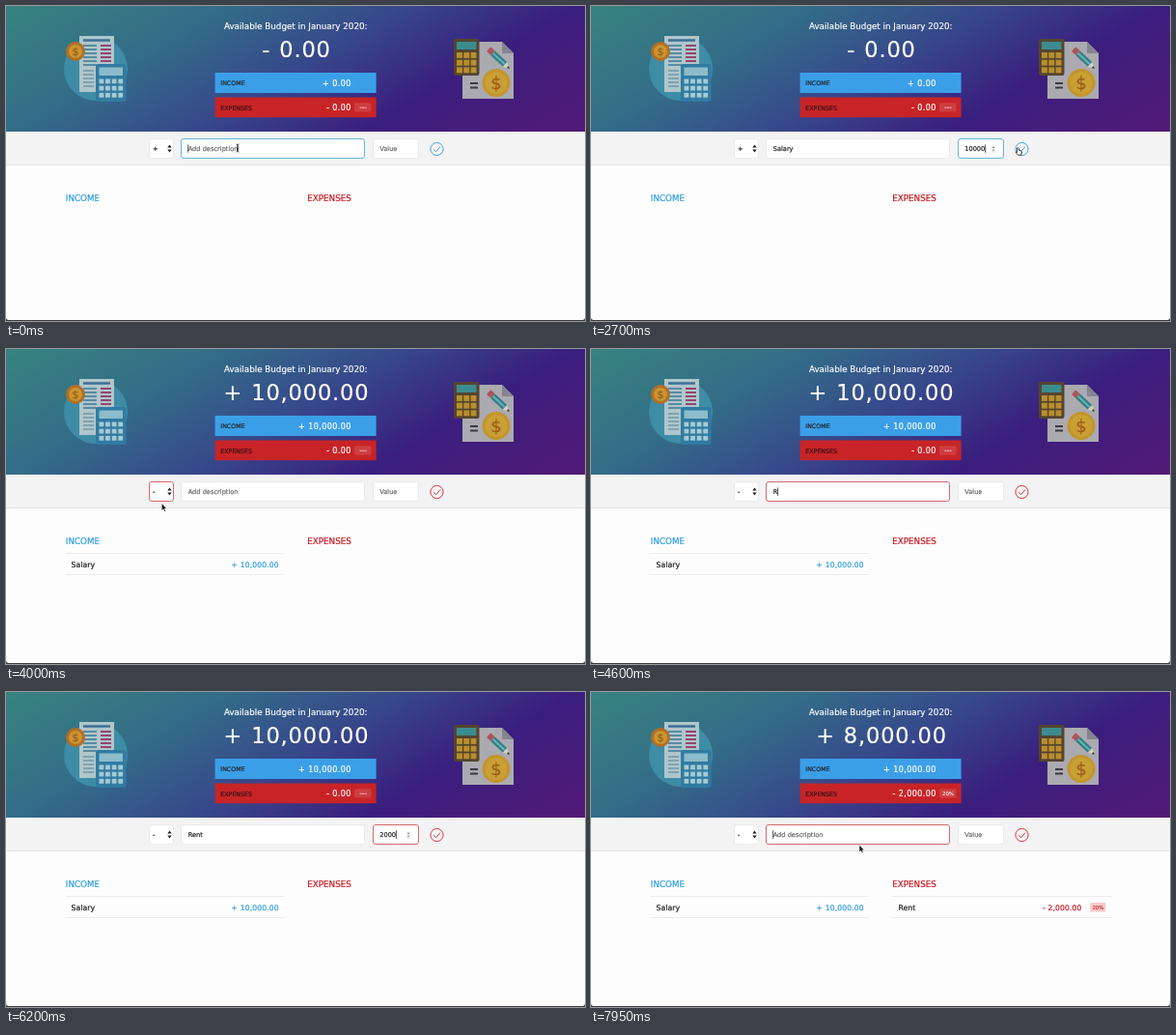
Animation, 600 px wide and 326 px high, one loop 8000 ms. Source, as an HTML page:

```html
<!DOCTYPE html>
<html lang="en">
<head>
<meta charset="utf-8">
<title>Budget</title>
<style>
  html, body { margin: 0; width: 100%; height: 100%; overflow: hidden; background: #fefdfe; }
  svg { display: block; width: 600px; height: 326px; font-family: "DejaVu Sans", Verdana, sans-serif; }
  text { fill: currentColor; stroke: currentColor; stroke-width: .2px; }
  .end { text-anchor: end; }
  .mid { text-anchor: middle; }
  .white { color: #fff; }
  .blue { color: #2a9de0; }
  .red { color: #c8161c; }
  .head { font-size: 8.75px; }
  .label { font-size: 6.3px; color: #23262c; }
  .sum { font-size: 8px; letter-spacing: .42px; color: #fff; }
  .field { fill: #fff; stroke-width: 1; }
  .input { font-size: 6.65px; }
  .row { font-size: 7.85px; color: #222; }
  .amount { font-size: 7.6px; letter-spacing: .15px; }
  .pct { font-size: 5.4px; text-anchor: middle; stroke-width: .1px; }
  .rule { stroke: #ececee; stroke-width: 1; }
</style>
</head>
<body>
<svg viewBox="0 0 600 326">
  <defs>
    <linearGradient id="sky" gradientUnits="userSpaceOnUse" x1="0" y1="0" x2="211" y2="359">
      <stop offset="0" stop-color="#38837f"/>
      <stop offset=".28" stop-color="#336c88"/>
      <stop offset=".5" stop-color="#37488b"/>
      <stop offset=".72" stop-color="#3a1e7e"/>
      <stop offset="1" stop-color="#541a77"/>
    </linearGradient>
  </defs>
  <rect width="600" height="326" fill="#3c3c40"/>
  <path d="M0 0H600V322Q600 325 597 325H3Q0 325 0 322Z" fill="#fefdfe"/>
  <rect width="600" height="130" fill="url(#sky)"/>

  <!-- invoice and calculator -->
  <g>
    <circle cx="93" cy="65" r="33" fill="#3e8ca6"/>
    <path d="M76 31H112V89H76Z" fill="#b0c6ca"/>
    <path d="M80 35.5H108" stroke="#3b6f96" stroke-width="2.5"/>
    <path d="M80 41H94M80 45H94M80 49H94M80 53H94M80 57H94M80 61H94" stroke="#3b7898" stroke-width="1.5"/>
    <path d="M98 41H109M98 45H109M98 49H109M98 53H109M98 57H109" stroke="#914672" stroke-width="1.8"/>
    <path d="M80 67H91M80 71H91M80 75H91M80 79H91M80 83H91" stroke="#6f98a8" stroke-width="1.4"/>
    <circle cx="72" cy="47" r="10" fill="#b06f28"/>
    <circle cx="72" cy="47" r="7" fill="#c9952f"/>
    <text x="72" y="51" class="mid" font-size="11" color="#9a5a20">$</text>
    <rect x="93" y="60" width="31.5" height="39" rx="2.5" fill="#317ba2"/>
    <rect x="96.5" y="63.5" width="24.5" height="8.5" fill="#8cbccb"/>
    <g id="keysLeft" fill="#a6cad4"></g>
  </g>

  <!-- calculator, sheet and coin -->
  <g>
    <path d="M473 37H514L526 49V96H473Z" fill="#abaab0"/>
    <path d="M514 37V49H526Z" fill="#85848f"/>
    <rect x="464" y="34" width="26.5" height="38" rx="2" fill="#54452f"/>
    <rect x="467" y="37" width="20.5" height="8" fill="#3b8c8e"/>
    <g id="keysRight" fill="#b98f2c"></g>
    <g transform="translate(522 65) rotate(223)">
      <path d="M0 0L7-3.2V3.2Z" fill="#d3cfc6"/>
      <path d="M0 0L3-1.4V1.4Z" fill="#333"/>
      <rect x="7" y="-3.2" width="17" height="6.4" fill="#2f7f86"/>
      <rect x="7" y="-1" width="17" height="2" fill="#6fb0ae"/>
      <rect x="24" y="-3.2" width="6" height="6.4" rx="1" fill="#a8555a"/>
    </g>
    <path d="M481 80H489M481 84.5H489" stroke="#3b3a42" stroke-width="1.8"/>
    <circle cx="508" cy="79.5" r="14.5" fill="#c2952f"/>
    <circle cx="508" cy="79.5" r="11.5" fill="#c9a033"/>
    <text x="508" y="86" class="mid" font-size="18" color="#9c5a20">$</text>
  </g>

  <text x="300.2" y="24" class="mid white" font-size="8.75">Available Budget in January 2020:</text>
  <text id="budget" x="301" y="53" class="mid white" font-size="22.5" letter-spacing=".85" word-spacing="1"></text>

  <rect x="216.6" y="69" width="167" height="21" fill="#3b9fe8"/>
  <rect x="216.6" y="94.5" width="167" height="20.7" fill="#c82427"/>
  <text x="222.3" y="82.3" class="label">INCOME</text>
  <text x="222.3" y="107.8" class="label" style="color:#3a1216">EXPENSES</text>
  <text id="incomeSum" x="357.7" y="83" class="sum end"></text>
  <text id="expenseSum" x="357.7" y="108.3" class="sum end"></text>
  <rect x="361" y="100.3" width="17.5" height="9.2" rx="1.5" fill="#fff" fill-opacity=".12"/>
  <text id="share" x="370" y="107" class="pct white"></text>

  <rect y="130" width="600" height="35" fill="#f4f3f4"/>
  <path d="M0 164.5H600" stroke="#e6e5e7"/>
  <rect id="typeBox" class="field" x="148.5" y="137.5" width="25" height="20" rx="2.5"/>
  <text id="sign" x="151.9" y="150.3" class="input" color="#111"></text>
  <path d="M167.3 146.6L169.5 143.4L171.7 146.6ZM167.3 148.4L169.5 151.6L171.7 148.4Z" fill="#222"/>
  <rect id="descBox" class="field" x="181.5" y="137.5" width="190" height="20" rx="2.5"/>
  <text id="desc" x="188.7" y="150.2" class="input"></text>
  <rect id="valueBox" class="field" x="380.5" y="137.5" width="47" height="20" rx="2.5"/>
  <text id="value" x="387.2" y="150.2" class="input"></text>
  <g id="spinner">
    <rect x="414.5" y="143.9" width="5" height="8" rx="1" fill="#f1f1f1"/>
    <path d="M415.7 147L417 145.1L418.3 147ZM415.7 148.7L417 150.6L418.3 148.7Z" fill="#8a8a8a"/>
  </g>
  <path id="caret" stroke="#222" stroke-width=".8"/>
  <g id="check" fill="none" stroke-width=".9">
    <circle cx="446.5" cy="148" r="6.6"/>
    <path d="M443.3 148.3L445.6 150.7L450 145.6"/>
  </g>

  <text x="61.8" y="202" class="head blue">INCOME</text>
  <text x="312.3" y="202" class="head red">EXPENSES</text>
  <g id="incomeRow">
    <path class="rule" d="M61.5 211.5H288M61.5 233.5H288"/>
    <text x="67.6" y="225.7" class="row">Salary</text>
    <text x="282.7" y="225.7" class="amount end blue">+ 10,000.00</text>
  </g>
  <g id="expenseRow">
    <path class="rule" d="M312 211.5H540M312 233.5H540"/>
    <text x="318.4" y="225.7" class="row">Rent</text>
    <text x="508.6" y="225.7" class="amount end red">- 2,000.00</text>
    <rect x="517.3" y="218" width="16" height="9.6" rx="1" fill="#fbcaca"/>
    <text x="525.4" y="224.9" class="pct red">20%</text>
  </g>

  <g id="menu">
    <rect x="140.5" y="140.5" width="31" height="30" rx="3" fill="#000" opacity=".12"/>
    <rect x="142" y="140" width="28" height="28.5" rx="2.5" fill="#6b6b6e"/>
    <rect id="pick" x="142" width="28" height="10.8" fill="#3a8eea"/>
    <path d="M145.3 149.2L147 151.2L149.8 146.8" fill="none" stroke="#fff" stroke-width=".9"/>
    <text x="152" y="151.3" class="input white">+</text>
    <text x="152.3" y="162.3" class="input white" font-weight="700">-</text>
  </g>

  <g id="cursor">
    <path id="arrow" d="M0 0V7.5L1.8 5.9L3 8.5L4.2 8L3.1 5.4H5.2Z" fill="#111" stroke="#fff" stroke-width=".5"/>
    <path id="beam" d="M-1.5-4Q0-4 0-3V3Q0 4-1.5 4M1.5-4Q0-4 0-3V3Q0 4 1.5 4M-1 1H1" fill="none" stroke="#222" stroke-width=".8"/>
    <path id="hand" d="M0 0Q1-.9 1.7.3L2.2 2.4L4.4 3.1Q5.2 3.5 4.9 5L4.3 7.2H1.2L-1.4 4.7Q-1.5 3.8-.4 4.2L.2 4.5Z" fill="#fff" stroke="#111" stroke-width=".8"/>
  </g>
</svg>
<script>
const LOOP = 8000, STEP = 50;
const ADD_INCOME = 2900, OPEN_MENU = 3400, PICK_MINUS = 3950, ADD_EXPENSE = 6900;
const FADE = 220;

const typing = {
  desc: [
    { text: "Salary", start: 120, gap: 100, end: ADD_INCOME },
    { text: "Rent", start: 4550, gap: 140, end: ADD_EXPENSE }
  ],
  value: [
    { text: "10000", start: 1750, gap: 125, end: ADD_INCOME },
    { text: "2000", start: 5600, gap: 140, end: ADD_EXPENSE }
  ]
};
const focusSteps = [
  [-1000, "desc"], [780, "value"], [ADD_INCOME, "desc"], [OPEN_MENU, "type"],
  [4200, "desc"], [5300, "value"], [ADD_EXPENSE, "desc"]
];
// time, x, y
const path = [
  [0, 240, 147], [2200, 240, 147], [2650, 441.5, 147], [2950, 441.5, 147],
  [3350, 164, 150], [3600, 164, 150], [3800, 160, 160], [3980, 160, 160],
  [4200, 215, 148], [6350, 215, 148], [6750, 444, 147], [7050, 444, 147],
  [7950, 278, 158.3]
];
const hidden = [[200, 2200], [4450, 6350]];

const $ = {};
document.querySelectorAll("[id]").forEach(el => $[el.id] = el);
const show = (el, on) => el.setAttribute("visibility", on ? "visible" : "hidden");
const put = (el, text) => { if (el.textContent !== text) el.textContent = text; };
const within = (t, a, b) => t >= a && t < b;

function keys(group, x, y, dx, dy, cols, rows, size) {
  for (let i = 0; i < cols * rows; i++) {
    const key = document.createElementNS("http://www.w3.org/2000/svg", "rect");
    const box = { x: x + i % cols * dx, y: y + Math.floor(i / cols) * dy, width: size, height: size };
    for (const name in box) key.setAttribute(name, box[name]);
    group.append(key);
  }
}
keys($.keysLeft, 96.5, 75.5, 6.6, 7.2, 4, 3, 4.8);
keys($.keysRight, 467, 48, 7.3, 7.7, 3, 3, 5.9);

function typed(name, t) {
  const run = typing[name].find(r => within(t, r.start, r.end));
  if (!run) return { text: "", last: -1000 };
  const n = Math.min(run.text.length, Math.floor((t - run.start) / run.gap) + 1);
  return { text: run.text.slice(0, n), last: run.start + (n - 1) * run.gap };
}

function mix(a, b, k) {
  return `rgb(${a.map((v, i) => Math.round(v + (b[i] - v) * k))})`;
}

function pointer(t) {
  const i = path.findIndex(p => p[0] > t);
  if (i < 0) return path[path.length - 1].slice(1);
  const [t0, x0, y0] = path[i - 1], [t1, x1, y1] = path[i];
  const k = (t - t0) / (t1 - t0), e = k * k * (3 - 2 * k);
  return [x0 + (x1 - x0) * e, y0 + (y1 - y0) * e];
}

function cursorKind(x, y) {
  if (Math.hypot(x - 446.5, y - 148) < 7) return "hand";
  const inField = within(x, 181, 372) || within(x, 380, 428);
  return inField && within(y, 137, 158) ? "beam" : "arrow";
}

function drawFields(t) {
  const minus = t >= PICK_MINUS;
  const accent = minus ? [212, 104, 106] : [104, 180, 210];
  const index = focusSteps.filter(s => s[0] <= t).length - 1;
  const [since, focus] = focusSteps[index];
  const previous = index ? focusSteps[index - 1][1] : "";
  const k = Math.min(1, (t - since) / FADE);

  for (const name of ["type", "desc", "value"]) {
    const glow = name === focus ? k : name === previous ? 1 - k : 0;
    $[name + "Box"].setAttribute("stroke", mix([234, 234, 236], accent, glow));
  }
  for (const [name, hint] of [["desc", "Add description"], ["value", "Value"]]) {
    const { text, last } = typed(name, t);
    put($[name], text || hint);
    $[name].setAttribute("color", text ? "#222" : "#6a6a6a");
    if (name !== focus) continue;
    const width = text ? $[name].getComputedTextLength() + .3 : 0;
    const x = +$[name].getAttribute("x") + width;
    $.caret.setAttribute("d", `M${x} 143.4V151.8`);
    show($.caret, (t - Math.max(since, last)) % 1000 < 500);
  }
  if (focus === "type") show($.caret, false);
  show($.spinner, focus === "value");
  put($.sign, minus ? "-" : "+");
  $.check.setAttribute("stroke", minus ? "#cc2630" : "#2f9bd8");
}

function drawTotals(t) {
  const earned = t >= ADD_INCOME, spent = t >= ADD_EXPENSE;
  put($.budget, spent ? "+ 8,000.00" : earned ? "+ 10,000.00" : "- 0.00");
  put($.incomeSum, earned ? "+ 10,000.00" : "+ 0.00");
  put($.expenseSum, spent ? "- 2,000.00" : "- 0.00");
  put($.share, spent ? "20%" : "---");
  $.share.style.fontSize = spent ? "5.4px" : "7px";
  show($.incomeRow, earned);
  show($.expenseRow, spent);
}

function drawPointer(t) {
  const [x, y] = pointer(t), kind = cursorKind(x, y);
  const visible = !hidden.some(([a, b]) => within(t, a, b));
  $.cursor.setAttribute("transform", `translate(${x} ${y})`);
  for (const name of ["arrow", "beam", "hand"]) show($[name], visible && name === kind);
  show($.menu, within(t, OPEN_MENU, PICK_MINUS));
  show($.pick, within(t, OPEN_MENU, PICK_MINUS));
  $.pick.setAttribute("y", y < 154 ? 143 : 154);
}

function frame() {
  const t = Math.floor(performance.now() % LOOP / STEP) * STEP;
  drawTotals(t);
  drawFields(t);
  drawPointer(t);
  requestAnimationFrame(frame);
}
frame();
</script>
</body>
</html>
```
